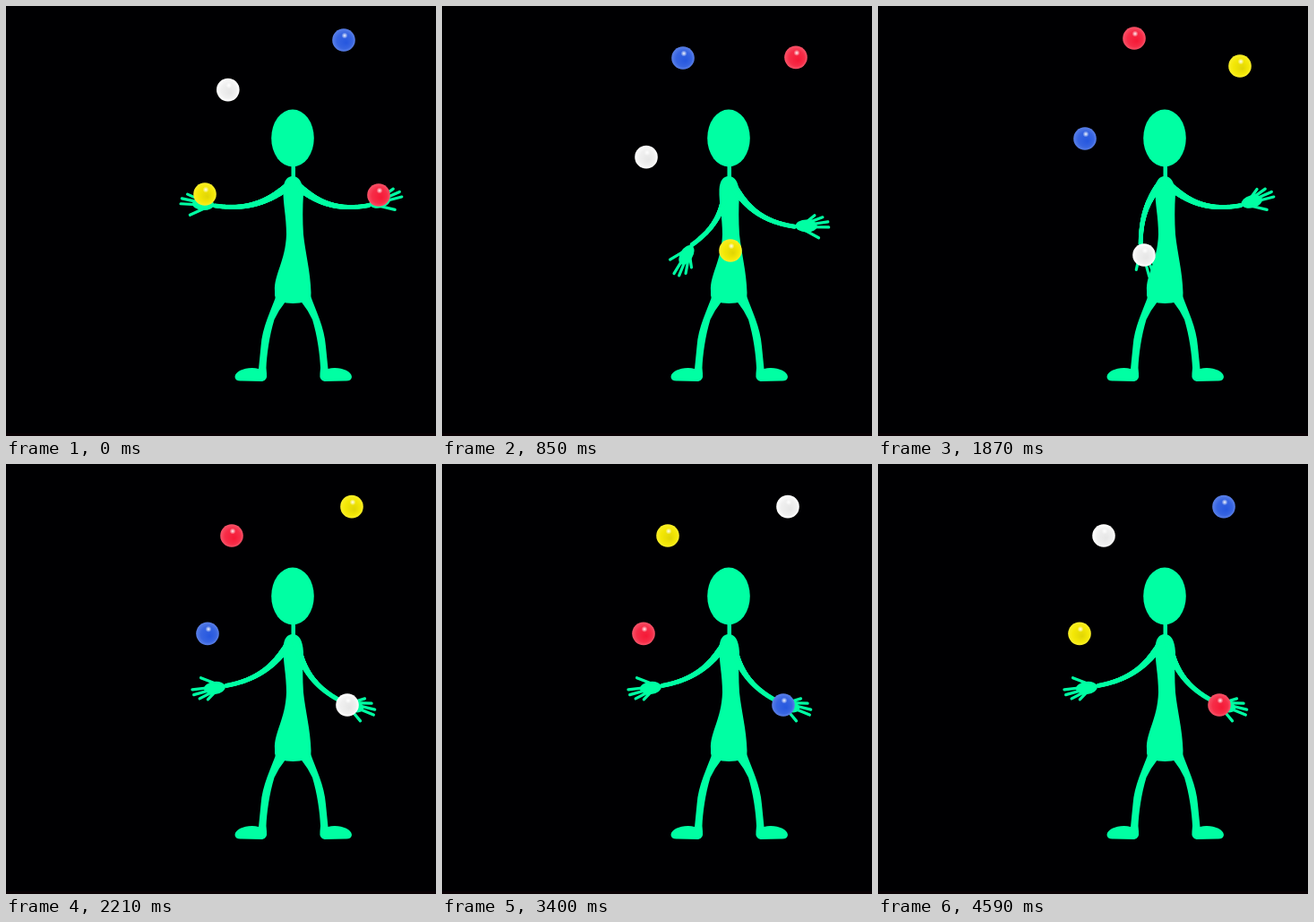
An HTML page with a canvas for the animation above (4760 ms loop, 480x480 px).

```html
<!DOCTYPE html>
<html lang="en">
<head>
<meta charset="utf-8">
<title>Juggler</title>
<style>
  html, body { margin: 0; height: 100%; overflow: hidden; background: #000002; }
  canvas { display: block; }
</style>
</head>
<body>
<canvas id="stage" width="480" height="480"></canvas>
<script>
const ctx = document.getElementById('stage').getContext('2d');
const STEP = 170, FRAMES = 28, BEAT = 7, GREEN = '#00ffa3';

// Key points [step, x, y] of a ball's trip: thrown, over the head, caught, passed back.
const trip = [
  [0, 416, 211], [2, 414, 110], [4, 404, 67], [7, 377, 38], [8, 336, 28],
  [11, 286, 36], [13, 252, 80], [18, 231, 148], [21, 222, 210], [23, 250, 263],
  [25, 297, 278], [26, 322, 273], [27, 381, 269], [28, 416, 211]
];

// Hue, saturation, lightness; each ball runs one beat ahead of the one before.
const balls = [[352, 92, 57], [224, 74, 55], [0, 0, 94], [57, 95, 49]];

const fingertips = [[27, 12], [38, 0], [37, -6], [31, -11], [22, -13]];

const torso = new Path2D(`M320 190 C327 190 331 196 332 210 C331 225 331 240 332 255
  C334 275 340 297 340.5 320 Q341 329 335 330 Q320 334 306 330 Q299 329 300 318
  C299 300 312 285 313 255 C313 235 309 220 309.5 205 C310 195 314 190 320 190Z`);
const leg = new Path2D(`M302 322 C296 340 286 358 284.500 380 L282 405
  C270 402 256 407 255.500 414 Q256 419 263 418.500 L286 419 Q292 418 291 410
  L290.500 404 C291 390 294 368 299.500 350 Q304 340 312 330Z`);

const lerp = (a, b, s) => a + (b - a) * s;
const radians = degrees => degrees * Math.PI / 180;

function disc(x, y, rx, ry = rx) {
  ctx.beginPath();
  ctx.ellipse(x, y, rx, ry, 0, 0, 2 * Math.PI);
  ctx.fill();
}

// Draws with x pointing outward from the given origin, on side 1 (right) or -1 (left).
function onSide(side, x, y, paint) {
  ctx.save();
  ctx.translate(x, y);
  ctx.scale(side, 1);
  paint();
  ctx.restore();
}

function drawBody() {
  ctx.fillStyle = ctx.strokeStyle = GREEN;
  disc(320, 147.5, 23.8, 32);
  ctx.fillRect(318.5, 176, 4.5, 18);
  ctx.fill(torso);
  ctx.fill(leg);
  onSide(-1, 641.5, 0, () => ctx.fill(leg));
}

function drawHand(palm) {
  ctx.scale(1, palm);
  disc(12, -1, 12, 7);
  ctx.lineWidth = 3.2;
  ctx.lineCap = 'round';
  ctx.beginPath();
  for (const [x, y] of fingertips) {
    ctx.moveTo(10, y * 0.3);
    ctx.lineTo(x - 1, y);
  }
  ctx.stroke();
}

function drawArm(side, x, { swing, reach, sag, hand, palm }) {
  onSide(side, x, 197, () => {
    ctx.rotate(radians(swing));
    for (let s = 0; s <= 1; s += 0.008) {
      const r = 1 - s, a = 3 * r * r * s, b = 3 * r * s * s, c = s * s * s;
      disc(-2 * r ** 3 + reach * (0.3 * a + 0.6 * b + c),
        4 * r ** 3 + sag * (0.85 * a + b), 2.4 + 2.2 * r * r);
    }
    ctx.translate(reach, 0);
    ctx.rotate(radians(hand - swing));
    drawHand(palm);
  });
}

// The right arm swings evenly down and back, highest at step 2 of the beat.
function rightPose(phase) {
  const drop = Math.abs(phase - 2);
  return { swing: -19 + 18.5 * drop, reach: 80 + drop, sag: 18, hand: -27 + 3.1 * drop ** 2, palm: 1 };
}

// The left arm sinks to step 4, then eases back up and turns its palm to catch.
function leftPose(phase) {
  const back = Math.max(0, (phase - 4) / 3);
  const lift = phase < 4 ? 4 - phase : 4 * back * back * (3 - 2 * back);
  return {
    swing: 74 - 8.5 * lift - 1.4 * lift ** 2,
    reach: Math.min(85, 72 + 6 * lift),
    sag: Math.min(17, 25 * lift - 8),
    hand: 105 - 51 * lift + 6 * lift ** 2,
    palm: phase ? -1 : 1
  };
}

function tripAt(step) {
  const next = trip.findIndex(key => key[0] > step);
  const [t0, x0, y0] = trip[next - 1], [t1, x1, y1] = trip[next];
  const s = (step - t0) / (t1 - t0);
  return [lerp(x0, x1, s), lerp(y0, y1, s)];
}

function glow(x, y, cx, cy, radius, stops) {
  const shade = ctx.createRadialGradient(cx, cy, 0, x, y, radius);
  stops.forEach((colour, i) => shade.addColorStop(i / (stops.length - 1), colour));
  ctx.fillStyle = shade;
  disc(x, y, radius);
}

function drawBall([hue, saturation, lightness], [x, y]) {
  const tone = change => `hsl(${hue} ${saturation}% ${lightness + change}%)`;
  glow(x, y, x + 3, y + 3, 12.8, [tone(-4), tone(-2), tone(0), tone(8)]);
  glow(x + 1, y - 5, x + 1, y - 5, 3.5, ['#fffffff0', '#ffffff00']);
}

function draw(now) {
  const frame = Math.floor(now / STEP) % FRAMES, phase = frame % BEAT;
  ctx.fillStyle = '#000002';
  ctx.fillRect(0, 0, 480, 480);
  ctx.fillStyle = '#080003';
  ctx.fillRect(0, 477, 480, 3);
  drawBody();
  drawArm(-1, 313, leftPose(phase));
  drawArm(1, 328, rightPose(phase));
  balls.forEach((ball, index) => drawBall(ball, tripAt((frame + index * BEAT) % FRAMES)));
}

const start = performance.now();
function tick() {
  draw(performance.now() - start);
  requestAnimationFrame(tick);
}
tick();
</script>
</body>
</html>
```
